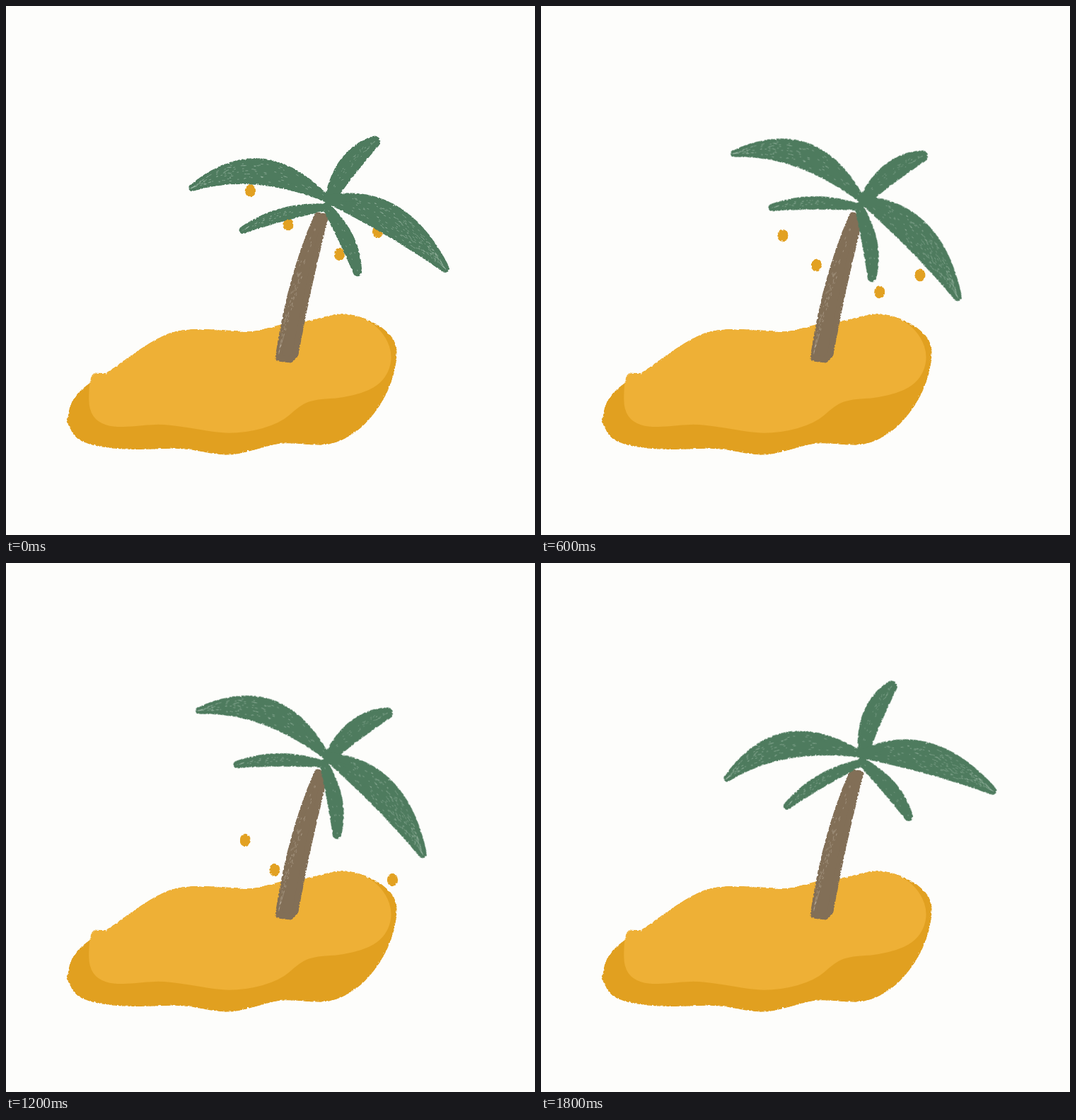
Write an HTML page that moves like this. It is 748x748 px and loops after 2 s.

```html
<!DOCTYPE html>
<html lang="en">
<head>
<meta charset="utf-8">
<title>Palm island</title>
<style>
@property --k { syntax: '<number>'; inherits: true; initial-value: 0; }

html, body { margin: 0; width: 100%; height: 100%; overflow: hidden; background: #fdfdfb; }
svg { display: block; width: 100vw; height: 100vh; animation: tick 2s steps(10) infinite; }
path { stroke-linejoin: round; stroke-linecap: round; }

/* --k counts the ten drawings of the loop */
@keyframes tick { to { --k: 10; } }

#crown { transform-origin: 452px 270px; animation: sway 2s step-end infinite; }
@keyframes sway {
  0%, 40%, 100% { transform: none; }
  10%, 90% { transform: translate(-3px, -2px) rotate(-15deg); }
  20%, 50%, 70% { transform: translate(-4px, -4px); }
  30%, 60%, 80% { transform: rotate(15deg); }
}

/* Slow for two steps, then a kick and a steady fall until --last */
.date {
  --fall: calc(16.5 * min(var(--k), 2) + 22.5 * max(var(--k) - 2, 0) + var(--kick) * clamp(0, var(--k) - 2, 1));
  fill: #e2a122;
  opacity: calc(var(--last) + 1 - var(--k));
  transform: translate(calc((var(--x) + var(--drift) * var(--k)) * 1px), calc((var(--y) + var(--fall)) * 1px));
}
</style>
</head>
<body>
<svg viewBox="0 0 748 748">
  <defs>
    <!-- frays the outline, keeps the inside smooth -->
    <filter id="chalk" filterUnits="userSpaceOnUse" x="0" y="0" width="748" height="748" color-interpolation-filters="sRGB">
      <feTurbulence type="fractalNoise" baseFrequency=".32" numOctaves="2" seed="4" result="noise"/>
      <feDisplacementMap in="SourceGraphic" in2="noise" scale="6" xChannelSelector="R" yChannelSelector="G" result="frayed"/>
      <feComposite in="SourceGraphic" in2="frayed" operator="in"/>
    </filter>
    <ellipse id="fruit" rx="7.7" ry="9.2"/>
  </defs>
  <g filter="url(#chalk)" stroke-width="1.5">
    <path fill="#e1a020" stroke="#e1a020" d="M89 577C92 545 125 530 143 519S208 468 240 461S310 460 345 461
      C365 460 385 449 415 447S455 436 475 436C505 436 550 458 552 487C553 543 505 618 445 620
      C425 620 412 617 390 618S340 634 313 634S265 624 235 625S110 632 95 604S88 590 89 577Z"/>
    <path fill="#eeb036" stroke="#eeb036" d="M143 519C161 508 208 468 240 461S310 460 345 461
      C365 460 385 449 415 447S455 436 475 436C520 436 549 475 543 505S512 548 465 554
      C425 555 418 562 400 578S345 603 315 603S250 591 215 591S118 610 118 556S130 525 143 519Z"/>
  </g>
  <g id="trunk" filter="url(#chalk)">
    <path fill="#826f57" stroke="#826f57" stroke-width="9" d="M440 296Q400 390 385 498L402 500L409 493Q430 380 452 298Z"/>
  </g>
  <g filter="url(#chalk)">
    <use href="#fruit" class="date" style="--x:345.5; --y:261; --drift:-1.2; --kick:8; --last:8"/>
    <use href="#fruit" class="date" style="--x:399; --y:309; --drift:-3.2; --kick:2; --last:7"/>
    <use href="#fruit" class="date" style="--x:525.5; --y:319; --drift:3.5; --kick:6; --last:7"/>
    <use href="#fruit" class="date" style="--x:471.5; --y:351; --drift:2.4; --kick:-2; --last:5"/>
  </g>
  <g id="crown"><g id="leaves" filter="url(#chalk)"></g></g>
</svg>
<script>
let seed = 11;
const rand = () => (seed = seed * 16807 % 2147483647) / 2147483647;
const mix = (a, b, t) => a.map((v, i) => v + (b[i] - v) * t);

function addPath(id, attrs) {
  const path = document.createElementNS('http://www.w3.org/2000/svg', 'path');
  for (const key in attrs) path.setAttribute(key, attrs[key]);
  document.getElementById(id).append(path);
}

// Dry-brush flecks between two curves that share both ends, denser towards the tip
function flecks(id, color, count, base, side1, side2, tip) {
  let d = '';
  for (let i = 0; i < count; i++) {
    const t = Math.sqrt(rand()), bend = mix(side1, side2, rand());
    const spot = s => mix(mix(base, bend, s), mix(bend, tip, s), s).map(v => v.toFixed(1));
    d += `M${spot(t)}L${spot(t + .004 + rand() * .012)}`;
  }
  addPath(id, { d, stroke: color, 'stroke-width': .9, fill: 'none', opacity: .6 });
}

// A leaf is a lens between two curves, rounded by its outline
function leaf(round, count, base, side1, side2, tip) {
  const green = '#4e7b5e';
  addPath('leaves', {
    d: `M${base}Q${side1} ${tip}Q${side2} ${base}Z`,
    fill: green, stroke: green, 'stroke-width': 2 * round
  });
  flecks('leaves', '#a9c2b1', count, base, side1, side2, tip);
}

leaf(5, 120, [454, 273], [362, 176], [350, 231], [263, 257]);
leaf(8.4, 45, [459, 270], [474, 207], [490, 227], [521, 192]);
leaf(6, 210, [455, 273], [562, 254], [548, 320], [621, 371]);
leaf(5.4, 45, [450, 285], [385, 282], [385, 299], [335, 317]);
leaf(6.3, 12, [453, 284], [497, 327], [478, 332], [497, 376]);

flecks('trunk', '#b5a896', 90, [442, 300], [400, 390], [418, 390], [386, 490]);
</script>
</body>
</html>
```
